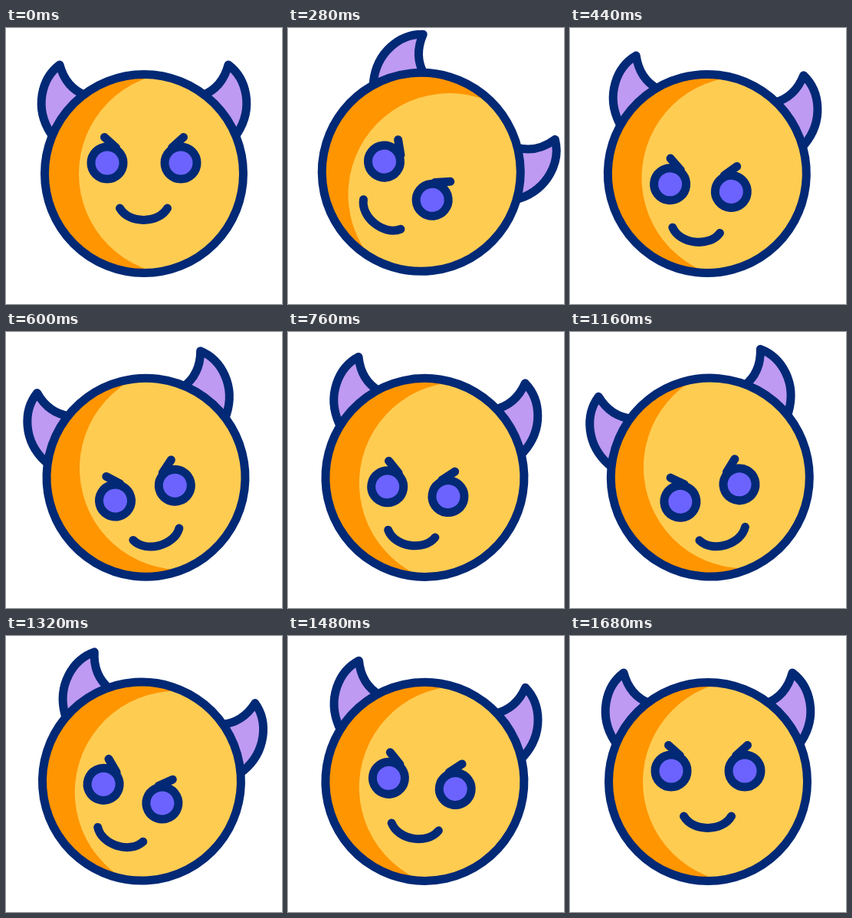
Animation, 360 px wide and 360 px high, one loop 2000 ms. Source, as an HTML page:

```html
<!DOCTYPE html>
<html lang="en">
<head>
<meta charset="utf-8">
<title>Laughing imp</title>
<style>
  html, body { margin: 0; width: 100%; height: 100%; overflow: hidden; background: #fff; }
  svg { display: block; width: 100vw; height: 100vh; }
  .line { stroke: #022975; stroke-width: 11; stroke-linecap: round; stroke-linejoin: round; }
</style>
</head>
<body>
<svg viewBox="0 0 360 360">
  <defs>
    <clipPath id="disc"><circle cx="180" cy="190" r="129.5"/></clipPath>
    <path id="horn" class="line" fill="#be9af2"
      d="M70 48C46 66 37 104 58 137L110 130L104 88C86 81 75 67 70 48Z"/>
    <g id="eye" class="line">
      <circle r="21" fill="#6c63ff"/>
      <path d="M-3.5-33.5L11.5-20" fill="none"/>
    </g>
  </defs>
  <g id="head">
    <use href="#horn"/>
    <use href="#horn" transform="matrix(-1 0 0 1 360 0)"/>
    <circle cx="180" cy="190" r="129.5" fill="#ff9500"/>
    <circle cx="227" cy="190" r="132" fill="#ffcc52" clip-path="url(#disc)"/>
    <circle class="line" cx="180" cy="190" r="129.5" fill="none"/>
    <g id="left"><use href="#eye" x="132" y="176"/></g>
    <g id="right"><use href="#eye" transform="matrix(-1 0 0 1 228 176)"/></g>
    <path id="mouth" class="line" fill="none" d="M148.5 235C160 255.5 199 255.5 210.5 235"/>
  </g>
</svg>
<script>
  const LOOP = 2000, STEP = 40;
  const [head, left, right, mouth] =
    ['head', 'left', 'right', 'mouth'].map(id => document.getElementById(id));

  // [time in ms, value]
  const tilt = [[0, 0], [286, 38.6], [571, -18], [713, 18], [854, -18],
                [995, 18], [1140, -18], [1286, 18], [1679, 0]];
  const look = [[0, 0], [280, 1], [1286, 1], [1679, 0]];

  const ease = p => (1 - Math.cos(Math.PI * p)) / 2;

  function at(keys, t) {
    const i = keys.findIndex(k => k[0] > t);
    if (i < 0) return keys[keys.length - 1][1];
    const [t0, a] = keys[i - 1], [t1, b] = keys[i];
    return a + (b - a) * ease((t - t0) / (t1 - t0));
  }

  function shift(el, x, y, k) {
    el.setAttribute('transform', `translate(${x * k} ${y * k})`);
  }

  function draw(now) {
    const t = Math.floor(now % LOOP / STEP) * STEP;
    const k = at(look, t);
    head.setAttribute('transform', `rotate(${at(tilt, t)} 180 180)`);
    shift(left, 1.7, 33.4, k);
    shift(right, -14, 33.6, k);
    shift(mouth, -5, 30, k);
  }

  let start;
  function tick(now) {
    start ??= now;
    draw(now - start);
    requestAnimationFrame(tick);
  }
  draw(0);
  requestAnimationFrame(tick);
</script>
</body>
</html>
```
